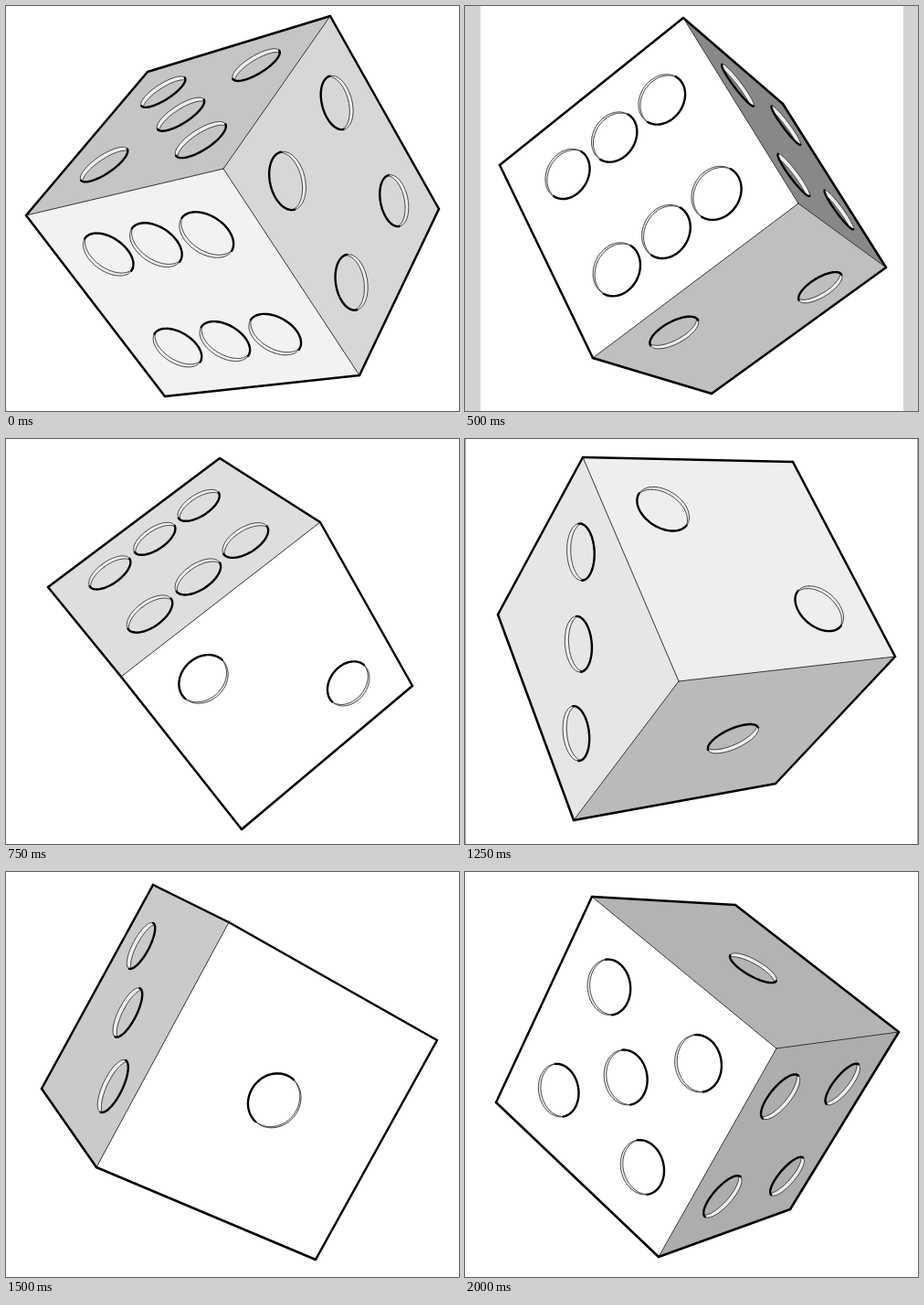
Write an HTML page with a canvas that moves like this. It is 496 px wide and 443 px high and loops after 2250 ms.

```html
<!DOCTYPE html>
<html lang="en">
<head>
<meta charset="utf-8">
<title>Rolling die</title>
<style>
  html, body { margin: 0; width: 100%; height: 100%; overflow: hidden; background: #fff; }
  canvas { display: block; width: 496px; height: 443px; }
</style>
</head>
<body>
<canvas id="stage"></canvas>
<script>
const W = 496, H = 443, STEP = 250, RADIUS = 0.107, DEPTH = 0.018;
const canvas = document.getElementById('stage');
const ctx = canvas.getContext('2d');
const ratio = window.devicePixelRatio || 1;
canvas.width = W * ratio;
canvas.height = H * ratio;
ctx.scale(ratio, ratio);
ctx.lineCap = ctx.lineJoin = 'round';

// Corners are indexed by three bits, one per cube axis: 4 = A, 2 = B, 1 = C.
// Each face lies on one axis; spots are placed on the other two, from -1 to 1.
const corners4 = [[-1, -1], [-1, 1], [1, -1], [1, 1]];
const faces = {
  1: { axis: 4, side: 0, spots: [[0, 0]] },
  2: { axis: 2, side: 0, spots: [[1, -1], [-1, 1]] },
  3: { axis: 1, side: 0, spots: [[1, -1], [0, 0], [-1, 1]] },
  4: { axis: 1, side: 1, spots: corners4 },
  5: { axis: 2, side: 1, spots: [...corners4, [0, 0]] },
  6: { axis: 4, side: 1, spots: [...corners4, [-1, 0], [1, 0]] }
};

// Screen corners of each pose (hidden ones are 0) and the grey of its visible faces.
const poses = [
  { pts: [0, [474, 222], [155, 72], [355, 11], [174, 427], [387, 404], [22, 229], [238, 178]],
    tone: { 5: 197, 6: 242, 4: 215 } },
  { pts: [0, [482, 243], 0, [353, 10], [150, 431], [391, 313], [13.5, 176], [238, 34]],
    tone: { 6: 255, 4: 188 } },
  { pts: [[270, 424], [461, 286], 0, [348, 107], [140, 385], [365, 216], [38, 174], [239, 13]],
    tone: { 6: 255, 4: 136, 2: 191 }, bars: [17, 480, '#d3d3d3'] },
  { pts: [[258, 427], [445, 270], 0, 0, [126, 260], [344, 91], [46, 162], [234, 21]],
    tone: { 6: 222, 2: 255 } },
  { pts: [[239, 418], [481, 280], [133, 421], 0, [104, 127], [359, 11], [19.5, 179], 0],
    tone: { 2: 255, 3: 208 } },
  { pts: [[234, 265], [471, 238], [119, 417], [340, 377], [129, 20], [359, 25], [36, 192], 0],
    tone: { 3: 230, 2: 238, 1: 186 }, bars: [1, 495, '#a8a8a8'] },
  { pts: [[244, 55], [472, 184], [99, 323], [339, 424], [161, 14], 0, [39, 237], 0],
    tone: { 3: 202, 1: 255 } },
  { pts: [[255, 26], [448, 191], [114, 176], [329, 361], 0, 0, [52.5, 275], [233, 430.5]],
    tone: { 1: 255, 5: 212 } },
  { pts: [[296, 36], [475, 175], [139, 27], [341, 193], 0, [356, 369], [34, 252], [212, 421]],
    tone: { 5: 255, 1: 179, 4: 173 } }
];

const cross = (p, q) => p[0] * q[1] - p[1] * q[0];
const minus = (p, q) => [p[0] - q[0], p[1] - q[1]];
const grey = n => `rgb(${n},${n},${n})`;

// Perspective map from the unit square to a quad.
function project(p00, p10, p01, p11) {
  const d1 = minus(p10, p11), d2 = minus(p01, p11);
  const s = minus(minus(p00, p10), minus(p01, p11));
  const den = cross(d1, d2), g = cross(s, d2) / den, h = cross(d1, s) / den;
  return (u, v) => [0, 1].map(i =>
    (p00[i] + u * (p10[i] * (1 + g) - p00[i]) + v * (p01[i] * (1 + h) - p00[i])) / (1 + g * u + h * v));
}

function trace(pts, closed = true) {
  ctx.beginPath();
  pts.forEach(p => ctx.lineTo(p[0], p[1]));
  if (closed) ctx.closePath();
}

function stroke(width, color) {
  ctx.lineWidth = width;
  ctx.strokeStyle = color;
  ctx.stroke();
}

// Mean screen vector pointing into the cube from a face.
function inward(pts, { axis, side }) {
  let x = 0, y = 0, n = 0;
  pts.forEach((p, i) => {
    const q = pts[i ^ axis];
    if (!p || !q || !(i & axis) === !!side) return;
    x += q[0] - p[0];
    y += q[1] - p[1];
    n++;
  });
  return [x / n * DEPTH, y / n * DEPTH];
}

function drawSpot(map, u, v, shift, fill) {
  const rim = [], count = 72;
  for (let i = 0; i < count; i++) {
    const t = i / count * 2 * Math.PI;
    rim.push(map(u + RADIUS * Math.cos(t), v + RADIUS * Math.sin(t)));
  }
  const base = rim.map(p => [p[0] + shift[0], p[1] + shift[1]]);
  ctx.save();
  trace(rim);
  ctx.fillStyle = '#eee';
  ctx.fill();
  ctx.clip();
  trace(base);
  ctx.fillStyle = fill;
  ctx.fill();
  stroke(0.9, '#333');
  ctx.restore();
  trace(rim);
  stroke(0.9, '#333');

  // Heavy line where the rim hides the wall of the hollow.
  const turn = Math.sign(cross(minus(rim[1], rim[0]), minus(rim[2], rim[1])));
  ctx.beginPath();
  rim.forEach((p, i) => {
    const q = rim[(i + 1) % count];
    if (cross(shift, minus(q, p)) * turn <= 0) return;
    ctx.moveTo(p[0], p[1]);
    ctx.lineTo(q[0], q[1]);
  });
  stroke(2.4, '#000');
}

function drawPose({ pts, tone, bars }) {
  ctx.fillStyle = '#fff';
  ctx.fillRect(0, 0, W, H);
  if (bars) {
    ctx.fillStyle = bars[2];
    ctx.fillRect(0, 0, bars[0], H);
    ctx.fillRect(bars[1], 0, W - bars[1], H);
  }

  const edges = {};
  for (const key in tone) {
    const face = faces[key], { axis, side } = face;
    const [a, b] = [4, 2, 1].filter(bit => bit !== axis);
    const o = side * axis, ring = [o, o + a, o + a + b, o + b];
    const fill = grey(tone[key]);
    trace(ring.map(i => pts[i]));
    ctx.fillStyle = fill;
    ctx.fill();
    ring.forEach((i, k) => {
      const j = ring[(k + 1) % 4], id = Math.min(i, j) * 8 + Math.max(i, j);
      edges[id] = (edges[id] || 0) + 1;
    });
    const map = project(pts[o], pts[o + a], pts[o + b], pts[o + a + b]);
    const shift = inward(pts, face);
    for (const [u, v] of face.spots) drawSpot(map, 0.5 + u / 4, 0.5 + v / 4, shift, fill);
  }

  for (const id in edges) {
    trace([pts[id >> 3], pts[id & 7]], false);
    if (edges[id] > 1) stroke(1, '#333');
    else stroke(2.5, '#000');
  }
}

let shown = -1;
const start = performance.now();
function tick() {
  const index = Math.floor((performance.now() - start) / STEP) % poses.length;
  if (index !== shown) drawPose(poses[shown = index]);
  requestAnimationFrame(tick);
}
tick();
</script>
</body>
</html>
```
